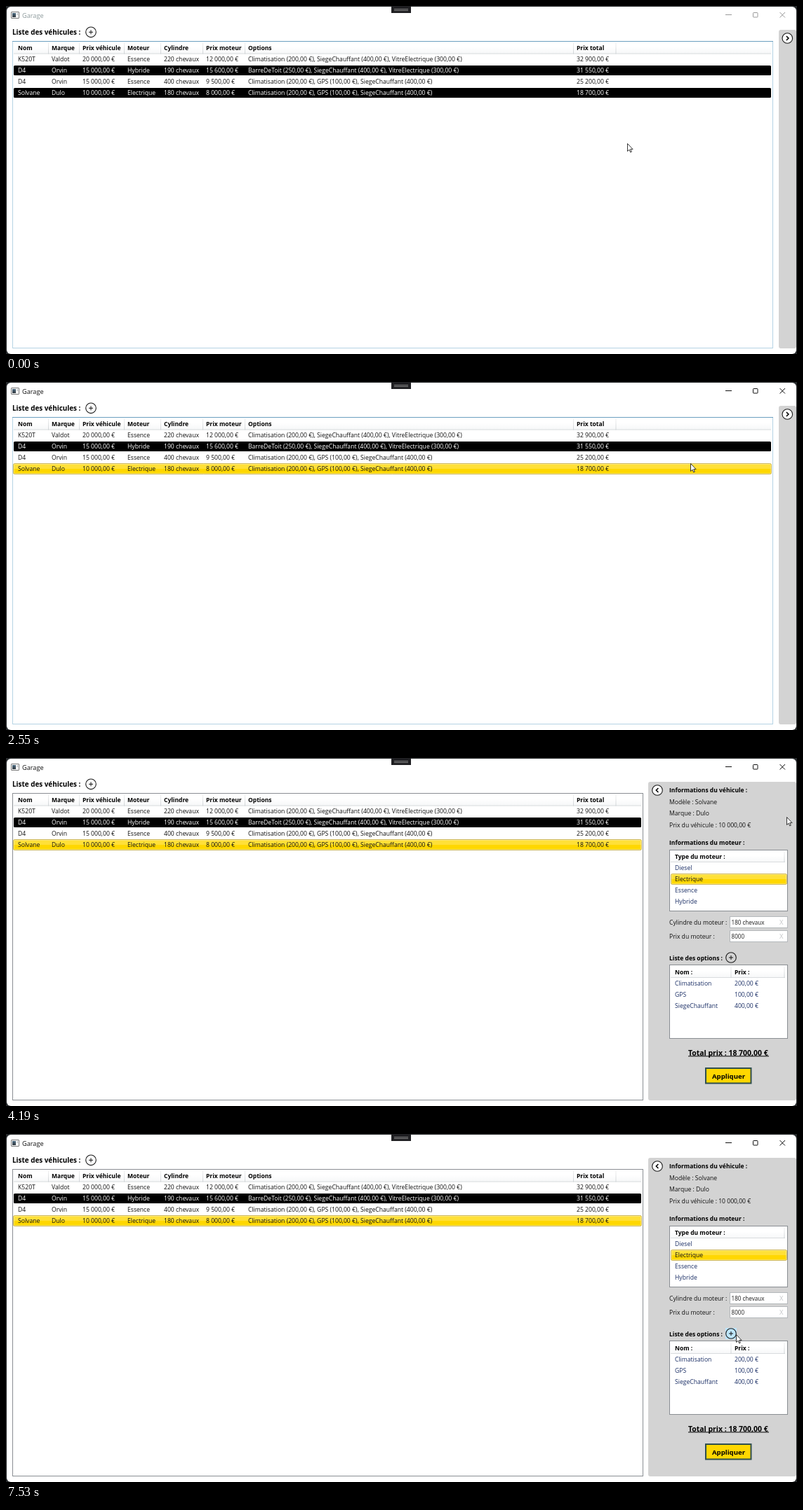
Write an HTML page with a canvas that moves like this. It is 1127 px wide and 497 px high and loops after 7990 ms.

```html
<!DOCTYPE html>
<html lang="fr">
<head>
<meta charset="utf-8">
<title>Garage</title>
<style>
html, body { margin: 0; width: 100%; height: 100%; overflow: hidden; background: #fff; }
canvas { display: block; }
</style>
</head>
<body>
<canvas id="stage" width="1127" height="497"></canvas>
<script>
const ctx = document.getElementById('stage').getContext('2d');
const LOOP = 7990, ACTIVATE = 1670, OPEN = 3990;
const GREY = '#d3d3d3', INK = '#111', NAVY = '#1b2f66', GOLD = '#ffd700', SKY = '#87cefa';

const columns = [
  [17, 'Nom'], [65, 'Marque'], [109, 'Prix véhicule'], [173, 'Moteur'],
  [225, 'Cylindre'], [285, 'Prix moteur'], [345, 'Options'], [813, 'Prix total']
];
const clim = 'Climatisation (200,00 €)', gps = 'GPS (100,00 €)';
const seat = 'SiegeChauffant (400,00 €)', glass = 'VitreElectrique (300,00 €)';
const bars = 'BarreDeToit (250,00 €)';
const cars = [
  ['K520T', 'Valdot', '20 000,00 €', 'Essence', '220 chevaux', '12 000,00 €', [clim, seat, glass].join(', '), '32 900,00 €'],
  ['D4', 'Orvin', '15 000,00 €', 'Hybride', '190 chevaux', '15 600,00 €', [bars, seat, glass].join(', '), '31 550,00 €'],
  ['D4', 'Orvin', '15 000,00 €', 'Essence', '400 chevaux', '9 500,00 €', [clim, gps, seat].join(', '), '25 200,00 €'],
  ['Solvane', 'Dulo', '10 000,00 €', 'Electrique', '180 chevaux', '8 000,00 €', [clim, gps, seat].join(', '), '18 700,00 €']
];
const engines = ['Diesel', 'Electrique', 'Essence', 'Hybride'];
const options = [['Climatisation', '200,00 €'], ['GPS', '100,00 €'], ['SiegeChauffant', '400,00 €']];

// Pointer moves: first step, last step (ms), step count, waypoints
const startPos = [885, 196];
const moves = [
  [440, 1130, 10, [[872, 180], [838, 138], [800, 112], [782, 116], [782, 118]]],
  [1530, 1530, 1, [[781, 118]]],
  [2260, 2600, 6, [[812, 119], [862, 119], [890, 118], [940, 118], [975, 116], [984, 102]]],
  [2860, 2930, 2, [[994, 96], [1000, 89]]],
  [3230, 3790, 9, [[1050, 88], [1104, 90], [1113, 47]]],
  [3990, 4190, 4, [[1112, 84]]],
  [4580, 5340, 12, [[1085, 110], [1035, 150], [1014, 178], [1008, 199]]],
  [5410, 5480, 2, [[1008, 206], [1007, 216]]],
  [6110, 6240, 3, [[1007, 218], [1007, 221], [1008, 218]]],
  [6440, 7190, 12, [[1014, 236], [1030, 266], [1038, 284]]],
  [7260, 7530, 4, [[1040, 286]]]
];

function pointerAt(t) {
  let pos = startPos;
  for (const [t0, t1, steps, points] of moves) {
    if (t < t0) break;
    const gap = (t1 - t0) / Math.max(1, steps - 1);
    const done = gap ? Math.min(steps, Math.floor((t - t0) / gap + 1e-6) + 1) : 1;
    const path = [pos, ...points];
    const u = done / steps * points.length;
    const i = Math.min(points.length - 1, Math.floor(u));
    pos = path[i].map((v, k) => Math.round(v + (path[i + 1][k] - v) * (u - i)));
  }
  return pos;
}

function text(str, x, y, color = INK, size = 8.62, weight = 400) {
  ctx.font = `${weight} ${size}px "Open Sans", "Noto Sans", sans-serif`;
  ctx.fillStyle = color;
  ctx.fillText(str, x, y);
}
const bold = (str, x, y, size = 8.5) => text(str, x, y, '#000', size, 700);

function rect(x, y, w, h, fill) {
  ctx.fillStyle = fill;
  ctx.fillRect(x, y, w, h);
}

function rounded(x, y, w, h, r, fill, stroke) {
  ctx.beginPath();
  ctx.roundRect(x, y, w, h, r);
  if (fill) { ctx.fillStyle = fill; ctx.fill(); }
  if (stroke) { ctx.strokeStyle = stroke; ctx.lineWidth = 1; ctx.stroke(); }
}

function line(points, color, width = 1) {
  ctx.beginPath();
  points.forEach(([x, y]) => ctx.lineTo(x, y));
  ctx.strokeStyle = color;
  ctx.lineWidth = width;
  ctx.stroke();
}

function vertical(y0, y1, ...stops) {
  const g = ctx.createLinearGradient(0, y0, 0, y1);
  stops.forEach(([at, color]) => g.addColorStop(at, color));
  return g;
}

// Flat row colour, glossy upper half, pale inner edge and thin outer edge
function bar(x, y, w, h, kind) {
  if (kind === 'black') return rounded(x, y, w, h, 1.5, '#000');
  const gold = kind === 'gold';
  rounded(x - .5, y - .5, w + 1, h + 1, 2, gold ? GOLD : SKY);
  rect(x, y, w, h / 2, gold ? 'rgba(255,255,255,.22)' : 'rgba(255,255,255,.44)');
  rounded(x + .5, y + .5, w - 1, h - 1, 1, null, 'rgba(255,255,255,.35)');
  rounded(x - .5, y - .5, w + 1, h + 1, 2, null, gold ? '#cdb75c' : '#a8daf5');
}

function listFrame(x, y, w, h, lit) {
  rect(x, y, w, h, '#fff');
  ctx.lineWidth = 1;
  ctx.strokeStyle = lit ? '#b5d3e4' : '#8a8e93';
  ctx.strokeRect(x + .5, y + .5, w - 1, h - 1);
  if (lit) line([[x, y + .5], [x + w, y + .5]], '#6c9fc0');
}

function header(x, y, right, h, seps) {
  rect(x, y, right - x, h, vertical(y, y + h, [0, '#fff'], [.4, '#fff'], [1, '#f6f7f8']));
  line([[x, y + h - .5], [right, y + h - .5]], '#d9dcde');
  seps.forEach(s => rect(s - .5, y, 1, h, vertical(y, y + h, [0, '#f2f2f2'], [1, '#cfd3d6'])));
}

function roundButton(cx, cy, fill, hover) {
  if (hover) rect(cx - 8, cy - 8, 16, 16, '#bee6fd');
  ctx.beginPath();
  ctx.arc(cx, cy, 7.3, 0, 7);
  ctx.fillStyle = hover ? '#bee6fd' : fill;
  ctx.fill();
  ctx.strokeStyle = '#1a1a1a';
  ctx.lineWidth = 1.1;
  ctx.stroke();
}

function plusButton(cx, cy, fill, hover) {
  roundButton(cx, cy, fill, hover);
  line([[cx - 3, cy], [cx + 3, cy]], INK);
  line([[cx, cy - 3], [cx, cy + 3]], INK);
}

function arrowButton(cx, dir, hover) {
  roundButton(cx, 46, '#fff', hover);
  line([[cx - 1.4 * dir, 43], [cx + 1.6 * dir, 46], [cx - 1.4 * dir, 49]], '#000', 1.6);
}

const inside = ([px, py], x, y, w, h) => px >= x && px < x + w && py >= y && py < y + h;

function windowFrame(active) {
  rect(0, 0, 1127, 497, '#26292b');
  rounded(1, 1, 1125, 496, 6, '#fff');
  rounded(7.5, 8.5, 11, 9, .5, '#fff', '#777');
  rect(9, 10, 5, 6, vertical(10, 16, [0, '#4f6f86'], [1, '#30363c']));
  rect(15.5, 10, 1.5, 3, '#b9c0c6');

  const ink = active ? '#111' : '#999';
  text('Garage', 23, 16.5, active ? '#111' : '#8d9a9c', 9.2);
  line([[1025, 12.5], [1034, 12.5]], ink);
  rounded(1064.5, 9.5, 6.5, 6.5, .8, null, ink);
  line([[1102.5, 9], [1110, 16.5]], ink);
  line([[1110, 9], [1102.5, 16.5]], ink);

  rect(549, 0, 28, 10, '#1f1f22');
  rect(553, 4, 20, 1, '#808080');
  rect(553, 6, 20, 1, '#808080');
}

function carList(pos, selected, open) {
  const right = open ? 908 : 1093;
  bold('Liste des véhicules :', 9, 41, 9.9);
  plusButton(121, 37.3, '#fff', false);
  listFrame(9, 50, right - 9, 439, !open);
  header(11, 52, right - 3, 16.5, [...columns.slice(1).map(c => c[0] - 4.5), 869]);
  columns.forEach(([x, name]) => bold(name, x, 63));

  cars.forEach((car, i) => {
    const y = Math.round(69 + i * 16.1);
    const over = inside(pos, 11, y - 1, right - 14, 16);
    const dark = i % 2 === 1;
    const kind = selected && i === 3 ? 'gold' : over ? 'blue' : dark ? 'black' : '';
    if (kind) bar(11, y, right - 14, 14, kind);
    car.forEach((cell, k) =>
      text(cell, columns[k][0], y + 10.2, kind === 'black' ? '#fff' : INK));
  });
}

function field(label, value, y) {
  text(label, 945, y + 11.7);
  rect(1031, y, 83, 17, '#fff');
  ctx.strokeStyle = '#b4b8bb';
  ctx.lineWidth = 1;
  ctx.strokeRect(1031.5, y + .5, 82, 16);
  text(value, 1033.5, y + 11.7, '#1c1c1c', 8.1);
  text('X', 1102, y + 11.7, '#c4c6c8', 9.5);
}

function engineList(pos) {
  listFrame(945, 131, 169, 88, inside(pos, 945, 131, 169, 88));
  header(947, 133, 1110, 16, [1109]);
  bold('Type du moteur :', 953, 143.5);
  engines.forEach((name, i) => {
    const y = Math.round(150 + i * 16.1);
    const over = inside(pos, 947, y - 1, 165, 16);
    const kind = i === 1 ? 'gold' : over ? 'blue' : '';
    if (kind) bar(948, y, 164, 14, kind);
    text(name, 953, y + 10, kind ? INK : NAVY);
  });
}

function sidePanel(pos) {
  rounded(915, 34, 211, 455, 3, GREY);
  arrowButton(928, -1, false);
  bold('Informations du véhicule :', 945, 49.2);
  text('Modèle : Solvane', 945, 66);
  text('Marque : Dulo', 945, 82.2);
  text('Prix du véhicule : 10 000,00 €', 945, 99);

  bold('Informations du moteur :', 945, 123.7);
  engineList(pos);
  field('Cylindre du moteur :', '180 chevaux', 226);
  field('Prix du moteur :', '8000', 246);

  bold('Liste des options :', 945, 288.5);
  plusButton(1033, 285, GREY, inside(pos, 1025, 277, 16, 16));
  listFrame(945, 295, 169, 106, false);
  header(947, 297, 1110, 17, [1033, 1109]);
  bold('Nom :', 953, 308.5);
  bold('Prix :', 1038, 308.5);
  options.forEach(([name, price], i) => {
    const y = 325 + Math.round(i * 16.1);
    text(name, 953, y, NAVY);
    text(price, 1038, y, NAVY);
  });

  bold('Total prix : 18 700,00 €', 972, 424.5, 10.45);
  rect(972, 425.4, 115, 1, '#000');
  rect(996, 442, 66.5, 23.5, '#2f4f4f');
  rect(998, 444, 62.5, 19.5, GOLD);
  bold('Appliquer', 1006, 457.5, 9.6);
}

function pointer([x, y]) {
  const shape = [[0, 0], [0, 11], [2.5, 8.7], [4.2, 12.4], [5.8, 11.7], [4.2, 8.1], [7.6, 8.1]];
  ctx.beginPath();
  shape.forEach(([dx, dy]) => ctx.lineTo(x + .5 + dx, y + .5 + dy));
  ctx.closePath();
  ctx.fillStyle = '#fff';
  ctx.fill();
  ctx.strokeStyle = '#222';
  ctx.lineWidth = .9;
  ctx.stroke();
}

function draw(now) {
  const t = now % LOOP;
  const pos = pointerAt(t);
  const active = t >= ACTIVATE, open = t >= OPEN;
  windowFrame(active);
  carList(pos, active, open);
  if (open) {
    sidePanel(pos);
  } else {
    rounded(1101, 34, 25, 455, 3, GREY);
    arrowButton(1113.3, 1, inside(pos, 1105, 38, 17, 17));
  }
  pointer(pos);
}

const begin = performance.now();
function tick() {
  draw(performance.now() - begin);
  requestAnimationFrame(tick);
}
tick();
</script>
</body>
</html>
```
